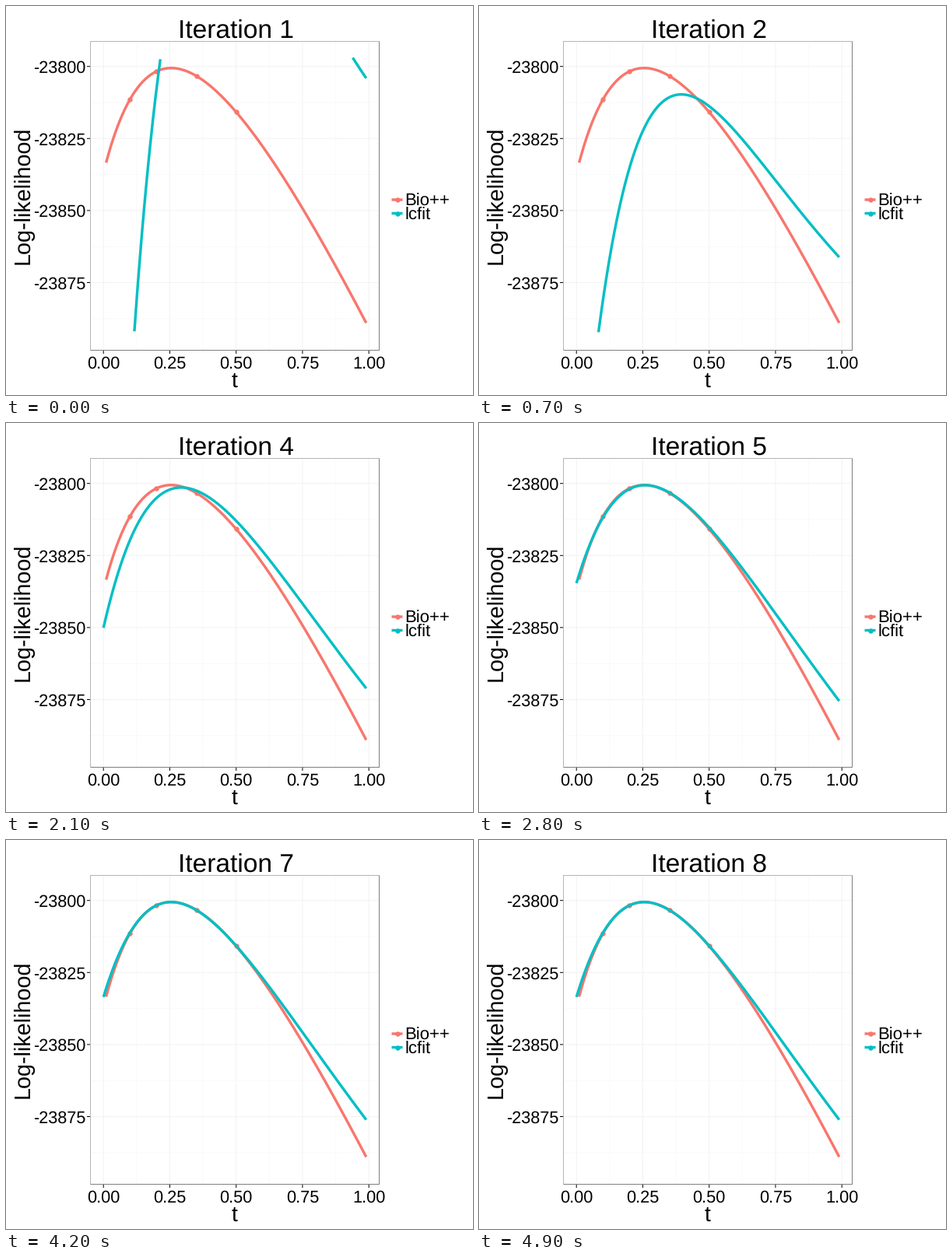
A matplotlib script for the animation above (6.3 s loop, 600 by 500 pixels).

```python
import matplotlib.pyplot as plt
import numpy as np
from matplotlib.animation import FuncAnimation

W, H, DPI = 600, 500, 100
PT = 72 / DPI
RED, TEAL = "#F8766D", "#00BFC4"
MAJOR, MINOR, BORDER = "#F2F2F2", "#FAFAFA", "#7F7F7F"
LEFT, RIGHT, TOP, BOTTOM = 108.5, 479.5, 45.5, 442.5
BASE, T_END = -23800, 0.99
LINE = 3.4

plt.rcParams["font.family"] = "Liberation Sans"
plt.rcParams["text.hinting"] = "none"
fig = plt.figure(figsize=(W / DPI, H / DPI), dpi=DPI, facecolor="white")
ax = fig.add_axes([0, 0, 1, 1])
ax.set(xlim=(0, W), ylim=(H, 0))
ax.axis("off")


def px(t):
    return 125.2 + 341 * t


def py(loglik):
    return 77.7 - 3.704 * (loglik - BASE)


def stroke(x, y, color, width=1.0, z=1):
    return ax.plot(x, y, color=color, lw=width * PT, zorder=z, snap=False,
                   solid_capstyle="butt", solid_joinstyle="round")[0]


def dots(x, y, color):
    ax.plot(x, y, "o", color=color, ms=6.4 * PT, mew=0, zorder=4, snap=False)


def label(x, y, text, size, ha="center", **kw):
    return ax.text(x, y, text, fontsize=size * PT, ha=ha, va="baseline",
                   color="black", **kw)


def loglik(t, start, peak_t, peak, first, last, bend):
    """Skewed parabola whose curvature decays from the first to the last point."""
    def curvature(at, value):
        return np.log((peak - value) / (at - peak_t) ** 2)

    def warp(at):
        return np.log(at + 0.4)

    u = (warp(t) - warp(start)) / (warp(T_END) - warp(start))
    u = u + bend * u * (1 - u)
    a, b = curvature(start, first), curvature(T_END, last)
    return BASE + peak - (t - peak_t) ** 2 * np.exp(a + (b - a) * u)


def bio(t):
    return loglik(t, 0.01, 0.255, -0.55, -33.4, -89.0, -0.04)


def lcfit(t, fit):
    return loglik(t, 0, *fit, -0.489)


# Peak position, then log-likelihood above BASE at the peak, t = 0 and T_END
FITS = [
    (0.450, 65.5, -304.4, -4.1),
    (0.395, -9.7, -165.3, -66.2),
    (0.338, -5.3, -85.5, -68.0),
    (0.293, -1.4, -50.1, -71.1),
    (0.259, -0.6, -34.6, -75.5),
    (0.255, -0.55, -33.5, -76.1),
]
ITERATIONS = 8

# Grid, ticks and tick labels
for k in range(9):
    color = MINOR if k % 2 else MAJOR
    stroke([px(k / 8)] * 2, [TOP, BOTTOM], color)
    if k < 8:
        stroke([LEFT, RIGHT], [py(BASE - 12.5 * k)] * 2, color)

for k in range(5):
    x = px(k / 4)
    stroke([x, x], [BOTTOM, BOTTOM + 4.5], "black")
    label(x, 466, f"{k / 4:.2f}", 21.8)

for value in range(BASE, BASE - 76, -25):
    y = py(value)
    stroke([LEFT - 4.5, LEFT], [y, y], "black")
    label(102, y + 8, str(value), 21.7, ha="right")

# Panel border
stroke([LEFT, LEFT, RIGHT], [BOTTOM, TOP, TOP], "#B5B5B5", z=2)
stroke([LEFT, RIGHT, RIGHT], [BOTTOM, BOTTOM, TOP], BORDER, z=2)

label(294, 489.5, "t", 28.3)
label(29.5, 243.2, "Log-likelihood", 28.7, rotation=90, rotation_mode="anchor")
title = label(295, 42, "", 33.5)

# Legend
for y, name, color in [(249, "Bio++", RED), (266.5, "lcfit", TEAL)]:
    stroke([495.5, 509.5], [y, y], color, LINE, 3)
    dots([502.5], [y], color)
    label(512.3, y + 8, name, 22.2, ha="left")

t_bio = np.linspace(0.01, T_END, 200)
stroke(px(t_bio), py(bio(t_bio)), RED, LINE, 3)
t_dots = np.array([0.1, 0.2, 0.35, 0.5])
dots(px(t_dots), py(bio(t_dots)), RED)

t_fit = np.linspace(0, T_END, 800)
fit_line = stroke([], [], TEAL, LINE, 5)


def update(frame):
    step = min(frame, ITERATIONS - 1)
    y = py(lcfit(t_fit, FITS[min(step, len(FITS) - 1)]))
    visible = (y > 66.5) & (y < 419.5)
    fit_line.set_data(px(t_fit), np.where(visible, y, np.nan))
    title.set_text(f"Iteration {step + 1}")
    return fit_line, title


anim = FuncAnimation(fig, update, frames=ITERATIONS + 1, interval=700,
                     repeat=True, repeat_delay=0, blit=False)
plt.show()
```
